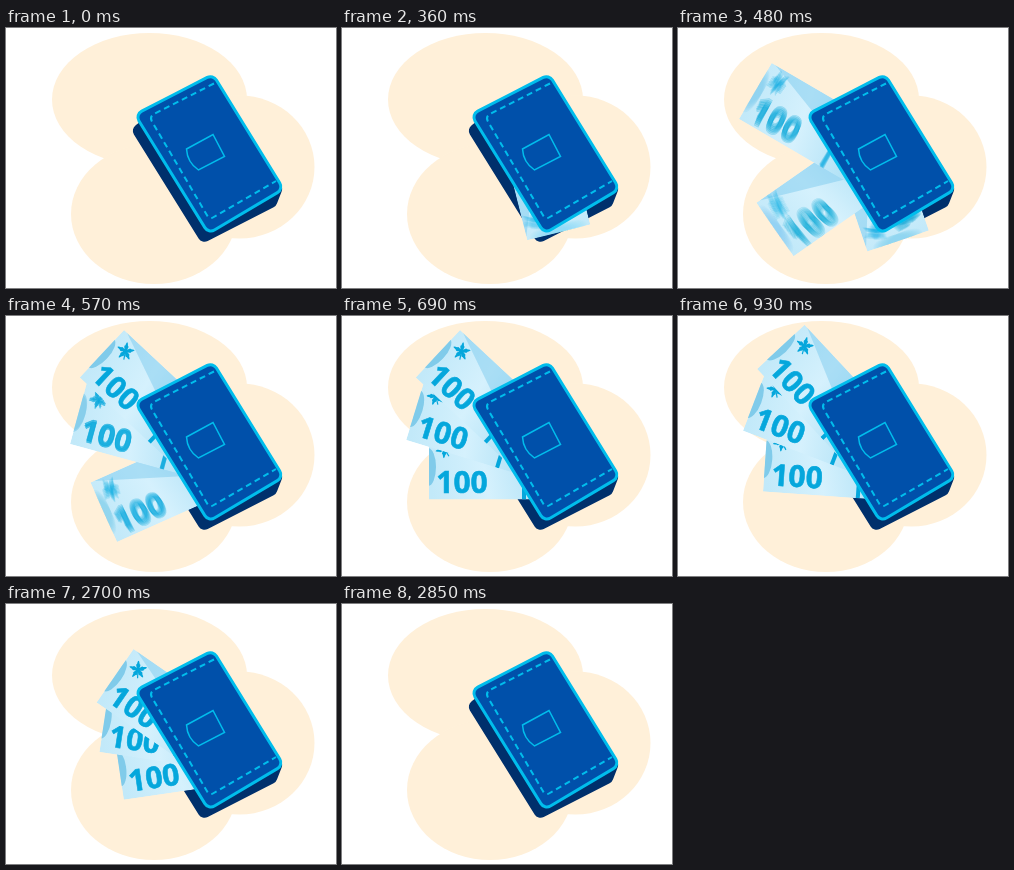
An HTML page with a canvas that plays this animation: 330x260 px, repeating every 3630 ms.

```html
<!DOCTYPE html>
<html lang="en">
<head>
<meta charset="utf-8">
<title>Wallet</title>
<style>
html, body { margin: 0; width: 100%; height: 100%; overflow: hidden; background: #fff; }
canvas { display: block; }
</style>
</head>
<body>
<canvas id="stage" width="330" height="260"></canvas>
<script>
const ctx = document.getElementById('stage').getContext('2d');
const LOOP = 3630, STEP = 30;
const SWING_START = 350, STAGGER = 60, SWING_TIME = 180;
const DRIFT_START = 690, DRIFT_TIME = 210, DRIFT = 4;
const EXIT_START = 2565, EXIT_END = 2850;
const HIDDEN_ANGLE = -122, HIDDEN_REACH = 50;
const HALF = 32.5; // half the height of a bill
const CYAN = '#00bdec', INK = '#05a7dc', NAVY = '#00306c', BLUE = '#0050aa', CREAM = '#fff0d9';

// Back to front: pivot, resting angle in degrees, reach from the pivot, order of appearance.
const bills = [
  { x: 199, y: 151, angle: 0, reach: 112, order: 2 },
  { x: 198, y: 131, angle: 17, reach: 130, order: 1 },
  { x: 199, y: 134, angle: 43, reach: 141, order: 0 }
];

const clamp = v => Math.min(1, Math.max(0, v));
const lerp = (a, b, u) => a + (b - a) * u;
const easeOut = (u, power) => 1 - (1 - u) ** power;
const swingStart = bill => SWING_START + bill.order * STAGGER;

function pose(bill, t) {
  const swing = clamp((t - swingStart(bill)) / SWING_TIME);
  const drift = easeOut(clamp((t - DRIFT_START) / DRIFT_TIME), 2);
  const exit = clamp((t - EXIT_START) / (EXIT_END - EXIT_START)) ** 2;
  return {
    angle: lerp(HIDDEN_ANGLE, bill.angle, easeOut(swing, 2)) + DRIFT * drift - 55 * exit,
    reach: lerp(HIDDEN_REACH, bill.reach, easeOut(swing, 5)) * (1 - exit)
  };
}

function fillEllipse(x, y, rx, ry, color) {
  ctx.beginPath();
  ctx.ellipse(x, y, rx, ry, 0, 0, Math.PI * 2);
  ctx.fillStyle = color;
  ctx.fill();
}

function roundedPath(points, radius) {
  const first = points[0], last = points[points.length - 1];
  const middle = [(first[0] + last[0]) / 2, (first[1] + last[1]) / 2];
  ctx.beginPath();
  ctx.moveTo(...middle);
  points.forEach((point, i) => ctx.arcTo(...point, ...(points[i + 1] || middle), radius));
  ctx.closePath();
}

// Five jagged lobes and a stem.
function drawLeaf() {
  ctx.beginPath();
  for (let a = 0; a < Math.PI * 2; a += Math.PI / 45) {
    const r = 5.7 + 2.6 * Math.cos(5 * a) + 0.9 * Math.cos(15 * a);
    ctx.lineTo(r * Math.sin(a), -r * Math.cos(a));
  }
  ctx.fill();
  ctx.fillRect(-0.6, 0, 1.2, 8.5);
}

function drawPaper(reach) {
  const paper = ctx.createLinearGradient(0, 10, 110, -10);
  paper.addColorStop(0, '#c2e9f9');
  paper.addColorStop(0.5, '#d5f1fd');
  paper.addColorStop(1, '#b2e2f6');
  ctx.fillStyle = paper;
  ctx.fillRect(0, -HALF, reach, HALF * 2);
  ctx.beginPath();
  ctx.moveTo(4, -HALF);
  ctx.lineTo(120, -HALF);
  ctx.lineTo(120, 12);
  ctx.fillStyle = 'rgba(115,198,234,0.45)';
  ctx.fill();
}

function drawPrint() {
  fillEllipse(-1, 0, 8, 19, '#80cbea');
  ctx.fillStyle = ctx.strokeStyle = INK;
  ctx.fillRect(93, -HALF, 4, HALF * 2);
  ctx.font = '700 30px "Open Sans", "Noto Sans", sans-serif';
  ctx.textAlign = 'center';
  ctx.lineWidth = 0.6;
  ctx.fillText('100', 33, 25.5);
  ctx.strokeText('100', 33, 25.5);
  ctx.translate(15.5, -18);
  ctx.rotate(-0.55);
  drawLeaf();
}

// The paper stays crisp; during a fast swing its print is smeared along the arc.
function drawBill(bill, t) {
  if (t <= swingStart(bill) || t >= EXIT_END) return;
  const { angle, reach } = pose(bill, t);
  const blur = t < DRIFT_START ? pose(bill, t + 5).angle - pose(bill, t - 5).angle : 0;
  const count = Math.max(1, Math.ceil(blur));

  ctx.save();
  ctx.translate(bill.x, bill.y);
  ctx.rotate(angle * Math.PI / 180);
  ctx.beginPath();
  ctx.rect(-reach, -HALF, reach, HALF * 2);
  ctx.clip();
  ctx.save();
  ctx.translate(-reach, 0);
  drawPaper(reach);
  ctx.restore();

  ctx.globalAlpha = Math.min(1, 1.3 / count);
  for (let i = 0; i < count; i++) {
    const offset = blur * ((i + 0.5) / count - 0.5);
    ctx.save();
    ctx.rotate(offset * Math.PI / 180);
    ctx.translate(-reach, 0);
    drawPrint();
    ctx.restore();
  }
  ctx.restore();
}

function drawBackdrop() {
  ctx.fillStyle = '#fff';
  ctx.fillRect(0, 0, 330, 260);
  fillEllipse(143.5, 71.5, 97.5, 66.5, CREAM);
  fillEllipse(233.5, 139, 75, 71.5, CREAM);
  fillEllipse(148, 186, 83, 70, CREAM);
}

function drawSide() {
  roundedPath([[124.5, 101], [196, 216], [270, 178], [277, 160], [206, 60], [138, 91]], 7);
  ctx.fillStyle = NAVY;
  ctx.fill();
}

function drawCover() {
  roundedPath([[129, 86.5], [202.5, 205.5], [277.5, 161], [207, 46.5]], 7);
  ctx.fillStyle = BLUE;
  ctx.fill();
  ctx.strokeStyle = CYAN;
  ctx.lineWidth = 3;
  ctx.stroke();

  ctx.lineWidth = 2;
  ctx.setLineDash([6, 4]);
  ctx.beginPath();
  ctx.moveTo(208, 55.5);
  ctx.arcTo(143, 88.5, 203.5, 191.5, 5);
  ctx.arcTo(203.5, 191.5, 270, 153, 4);
  ctx.lineTo(270, 153);
  ctx.stroke();
  ctx.setLineDash([]);

  ctx.lineWidth = 1.5;
  ctx.beginPath();
  ctx.moveTo(180.5, 121);
  ctx.lineTo(207, 106.5);
  ctx.lineTo(218.5, 128.5);
  ctx.lineTo(192.5, 142);
  ctx.bezierCurveTo(185, 137, 181, 130, 180.5, 121);
  ctx.closePath();
  ctx.stroke();
}

function render(now) {
  const t = Math.floor(now % LOOP / STEP) * STEP;
  drawBackdrop();
  drawSide();
  bills.forEach(bill => drawBill(bill, t));
  drawCover();
}

const start = performance.now();
function tick() {
  render(performance.now() - start);
  requestAnimationFrame(tick);
}
tick();
</script>
</body>
</html>
```
